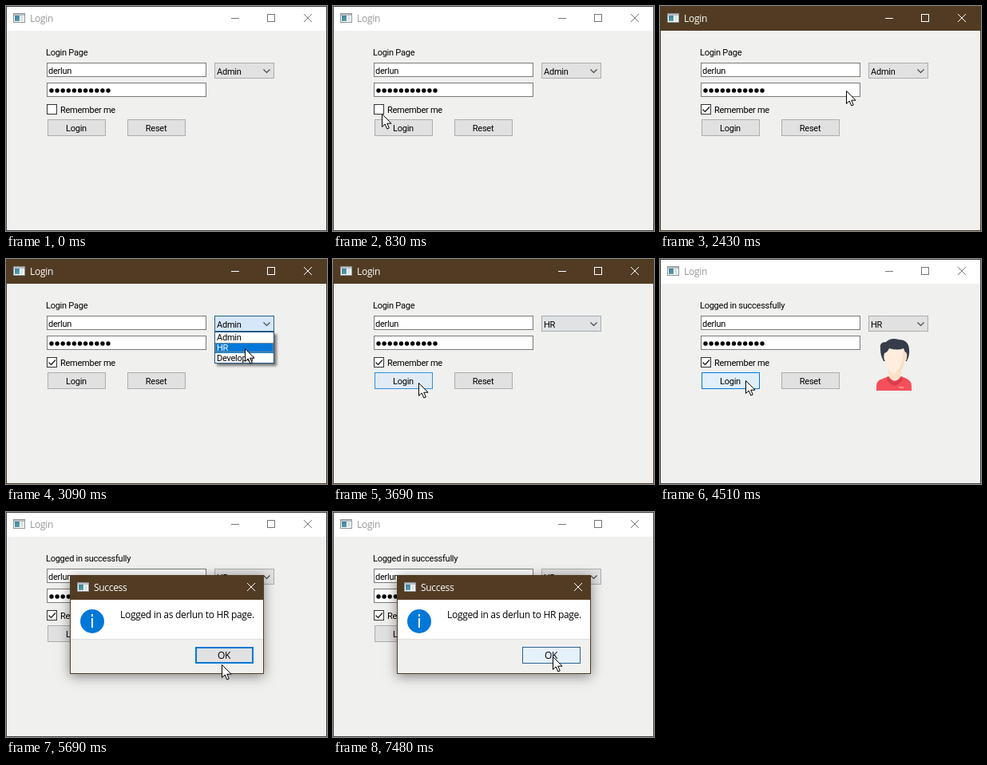
Recreate the animation shown at these times as an HTML page with a canvas. Size 402x282 px, loop 8000 ms.

```html
<!DOCTYPE html>
<html lang="en">
<head>
<meta charset="utf-8">
<title>Login</title>
<style>
html, body { margin: 0; width: 100%; height: 100%; overflow: hidden; }
canvas { display: block; }
</style>
</head>
<body>
<canvas id="stage" width="402" height="282"></canvas>
<script>
const W = 402, H = 282, LOOP = 8000;
const USER = 'derlun';
const BLUE = '#0078d7', BROWN = '#513c23', FACE = '#f0f0ef';
const screen = document.getElementById('stage').getContext('2d');
const layer = new OffscreenCanvas(W, H).getContext('2d');
let g = screen;

// time, x, y, easing into this point
const CURSOR = [
  [260, 190, 290], [900, 57, 130], [1070, 57, 130], [1440, 95, 150],
  [2160, 95, 150], [2600, 300, 84], [2950, 300, 84], [3080, 299, 112],
  [3240, 299, 112], [3690, 107, 155], [3790, 107, 155], [3890, 107, 152],
  [4900, 107, 152], [5120, 159, 172, 'in'], [5690, 270, 191, 'out'],
  [5850, 275, 192], [5980, 275, 192], [6000, 274, 192], [6710, 274, 192],
  [7000, 275, 188], [7380, 275, 188], [7480, 275, 181]
];
const DIALOG = [[4640, 0], [4800, .86], [4900, .86], [4960, 1]];

const clamp = v => Math.max(0, Math.min(1, v));
const EASE = {
  in: p => p * p,
  out: p => 1 - (1 - p) ** 2,
  smooth: p => p * p * (3 - 2 * p)
};

function track(keys, t, column) {
  let i = keys.findIndex(k => k[0] > t);
  if (i < 0) i = keys.length;
  if (i === 0) return keys[0][column];
  const a = keys[i - 1], b = keys[i];
  if (!b) return a[column];
  const p = EASE[b[3] || 'smooth']((t - a[0]) / (b[0] - a[0]));
  return a[column] + (b[column] - a[column]) * p;
}

// 0 to 1 after `on`, back to 0 after `off`
const pulse = (t, on, off, len = 130) => clamp((t - on) / len) - clamp((t - off) / len);

function box(x, y, w, h, fill, edge, line = 1) {
  g.fillStyle = fill;
  g.fillRect(x, y, w, h);
  if (!edge) return;
  g.strokeStyle = edge;
  g.lineWidth = line;
  g.strokeRect(x + line / 2, y + line / 2, w - line, h - line);
}

function faded(alpha, draw) {
  if (alpha <= 0) return;
  g.save();
  g.globalAlpha = alpha;
  draw();
  g.restore();
}

function write(s, x, y, color, font, spacing, align = 'left') {
  g.font = font;
  g.letterSpacing = spacing;
  g.textAlign = align;
  g.fillStyle = color;
  g.fillText(s, x, y);
}
const label = (s, x, y, color = '#000', align) =>
  write(s, x, y, color, '11px Roboto, sans-serif', '-0.25px', align);
const caption = (s, x, y, color, align) =>
  write(s, x, y, color, '12px "Open Sans", sans-serif', '-0.3px', align);

function line(color, width, ...pts) {
  g.strokeStyle = color;
  g.lineWidth = width;
  g.beginPath();
  for (let i = 0; i < pts.length; i += 2) g.lineTo(pts[i], pts[i + 1]);
  g.stroke();
}

function shape(fill, d) {
  g.fillStyle = fill;
  g.fill(new Path2D(d));
}

function cross(x, y, color) {
  line(color, 1, x, y, x + 10, y + 10);
  line(color, 1, x + 10, y, x, y + 10);
}

function windowIcon(x, y) {
  box(x, y, 15, 12, '#fff', '#8c9296');
  box(x + 1, y + 1, 13, 2, '#b9c0c4');
  const fill = g.createLinearGradient(x, y, x + 7, y + 11);
  fill.addColorStop(0, '#2c6f9e');
  fill.addColorStop(1, '#5fa4a8');
  box(x + 2, y + 3, 6, 7, fill);
  box(x + 9, y + 3, 4, 7, '#dfe5e8');
}

function frame(active) {
  const ink = active ? '#fff' : '#777';
  box(0, 0, W, H, FACE, active ? BROWN : '#444');
  box(1, 1, W - 2, 30, active ? BROWN : '#fff');
  windowIcon(9, 9);
  caption('Login', 30, 20, active ? '#fff' : '#999');
  line(ink, 1, 282, 15.5, 292, 15.5);
  g.strokeRect(327.5, 10.5, 9, 9);
  cross(373, 10, ink);
}

function button(text, x, hover, press) {
  box(x, 142, 73, 21, '#e1e1e1', '#adadad');
  faded(hover, () => box(x, 142, 73, 21, '#e1effb', BLUE));
  faded(press, () => box(x, 142, 73, 21, '#cce4f7', '#005499'));
  label(text, x + 36, 157, '#000', 'center');
}

function checkbox(t) {
  box(51, 123, 13, 13, '#fff', '#333');
  faded(pulse(t, 850, 1150), () => box(51, 123, 13, 13, '#fff', BLUE));
  if (t >= 950) line('#222', 1.3, 53.5, 129.5, 56.5, 132.5, 62, 126.5);
  label('Remember me', 68, 134);
}

function combo(t) {
  box(261, 71, 75, 20, '#e1e1e1', '#adadad');
  faded(pulse(t, 2510, 3240, 500), () => box(261, 71, 75, 20, '#d5e7f8', '#24638f'));
  label(t < 3220 ? 'Admin' : 'HR', 264, 86);
  line('#444', 1.1, 322.5, 79.5, 326.5, 83.5, 330.5, 79.5);
}

function popup(t) {
  if (t < 2750 || t >= 3220) return;
  g.save();
  g.shadowColor = 'rgba(0,0,0,.5)';
  g.shadowBlur = 3;
  g.shadowOffsetX = g.shadowOffsetY = 3;
  g.fillStyle = '#fff';
  g.fillRect(261, 91, 75, 40);
  g.restore();
  box(261, 91, 75, 40, '#fff', '#24517c');
  const chosen = track(CURSOR, t, 2) >= 105 ? 1 : 0;
  ['Admin', 'HR', 'Developer'].forEach((s, i) => {
    const y = 92 + i * 13;
    if (i === chosen) {
      box(262, y, 73, 13, BLUE);
      g.setLineDash([1, 1]);
      g.strokeStyle = '#f0a050';
      g.strokeRect(262.5, y + .5, 72, 11);
      g.setLineDash([]);
    }
    label(s, 264, y + 10, i === chosen ? '#fff' : '#000');
  });
}

function avatar() {
  shape('#ffe0c8', 'M286 138H302V150Q294 160 286 150Z');
  shape('#f44f5a', 'M271 165V159Q271 152 279 150L286 147Q294 158 302 147L309 150Q315 153 315 159V165Z');
  shape('#d93f4d', 'M286 147Q294 161 302 147L304 151Q294 166 284 151Z');
  shape('#ff8a8e', 'M299 160H305V162H299Z');
  shape('#373c4b', 'M276 113Q274 104 283 104Q289 98 299 101Q311 101 312 113Q313 121 309 128H280Q276 121 276 113Z');
  shape('#ffeedd', 'M281 118Q285 117 287 112Q298 115 305 112Q306 117 309 118Q310 127 306 129Q304 143 294 143Q284 142 283 129Q279 126 281 118Z');
  shape('#fbdcc5', 'M305 112Q306 117 309 118Q310 127 306 129Q304 143 294 143Q301 138 303 128Z');
}

function form(t) {
  const done = t >= 4340;
  frame(t >= 950 && t < 4450);
  label(done ? 'Logged in successfully' : 'Login Page', 50, 62);
  box(51, 71, 200, 18, '#fff', '#7a7a7a');
  label(USER, 53, 85);
  box(51, 96, 200, 18, '#fff', '#7a7a7a');
  g.fillStyle = '#000';
  for (let i = 0; i < 11; i++) {
    g.beginPath();
    g.arc(57 + i * 7.1, 106, 2.7, 0, 7);
    g.fill();
  }
  combo(t);
  checkbox(t);
  button('Login', 52, pulse(t, 1280, 2255) + pulse(t, 3590, 4620), pulse(t, 3790, 4330));
  button('Reset', 152, 0, 0);
  if (done) avatar();
  popup(t);
}

function message(t) {
  g.clearRect(0, 0, W, H);
  g.save();
  g.shadowColor = 'rgba(0,0,0,.45)';
  g.shadowBlur = 14;
  g.shadowOffsetY = 3;
  g.fillStyle = BROWN;
  g.fillRect(80, 79, 243, 124);
  g.restore();
  windowIcon(89, 88);
  caption('Success', 110, 99, '#fff');
  cross(302, 89, '#fff');
  box(81, 110, 241, 49, '#fff');
  box(81, 159, 241, 43, FACE);
  box(81, 159, 241, 1, '#dfdfdf');
  g.fillStyle = BLUE;
  g.beginPath();
  g.arc(108, 137, 15, 0, 7);
  g.fill();
  box(107, 133, 2, 12, '#fff');
  box(107, 128, 2, 3, '#fff');
  caption(`Logged in as ${USER} to HR page.`, 143, 133, '#000');
  box(237, 169, 73, 21, '#e1e1e1', BLUE, 2);
  faded(pulse(t, 5475, 5562, 100) + pulse(t, 6855, LOOP), () =>
    box(237, 169, 73, 21, '#e5f1fb', '#2c628b'));
  caption('OK', 273, 184, '#000', 'center');
}

function dialog(t) {
  const alpha = track(DIALOG, t, 1);
  if (alpha <= 0) return;
  g = layer;
  message(t);
  g = screen;
  faded(alpha, () => {
    const k = .93 + .07 * alpha;
    g.translate(201.5 * (1 - k), 141 * (1 - k));
    g.scale(k, k);
    g.drawImage(layer.canvas, 0, 0);
  });
}

function pointer(t) {
  const arrow = new Path2D('M.5 .5V16.5L4.2 13L6.8 19L9.3 18L6.7 12.2H12Z');
  g.save();
  g.translate(Math.round(track(CURSOR, t, 1)), Math.round(track(CURSOR, t, 2)));
  g.fillStyle = '#fff';
  g.fill(arrow);
  g.strokeStyle = '#000';
  g.lineWidth = 1;
  g.stroke(arrow);
  g.restore();
}

const start = performance.now();
function draw(now) {
  const t = Math.max(0, now - start) % LOOP;
  form(t);
  dialog(t);
  pointer(t);
  requestAnimationFrame(draw);
}
draw(start);
</script>
</body>
</html>
```
